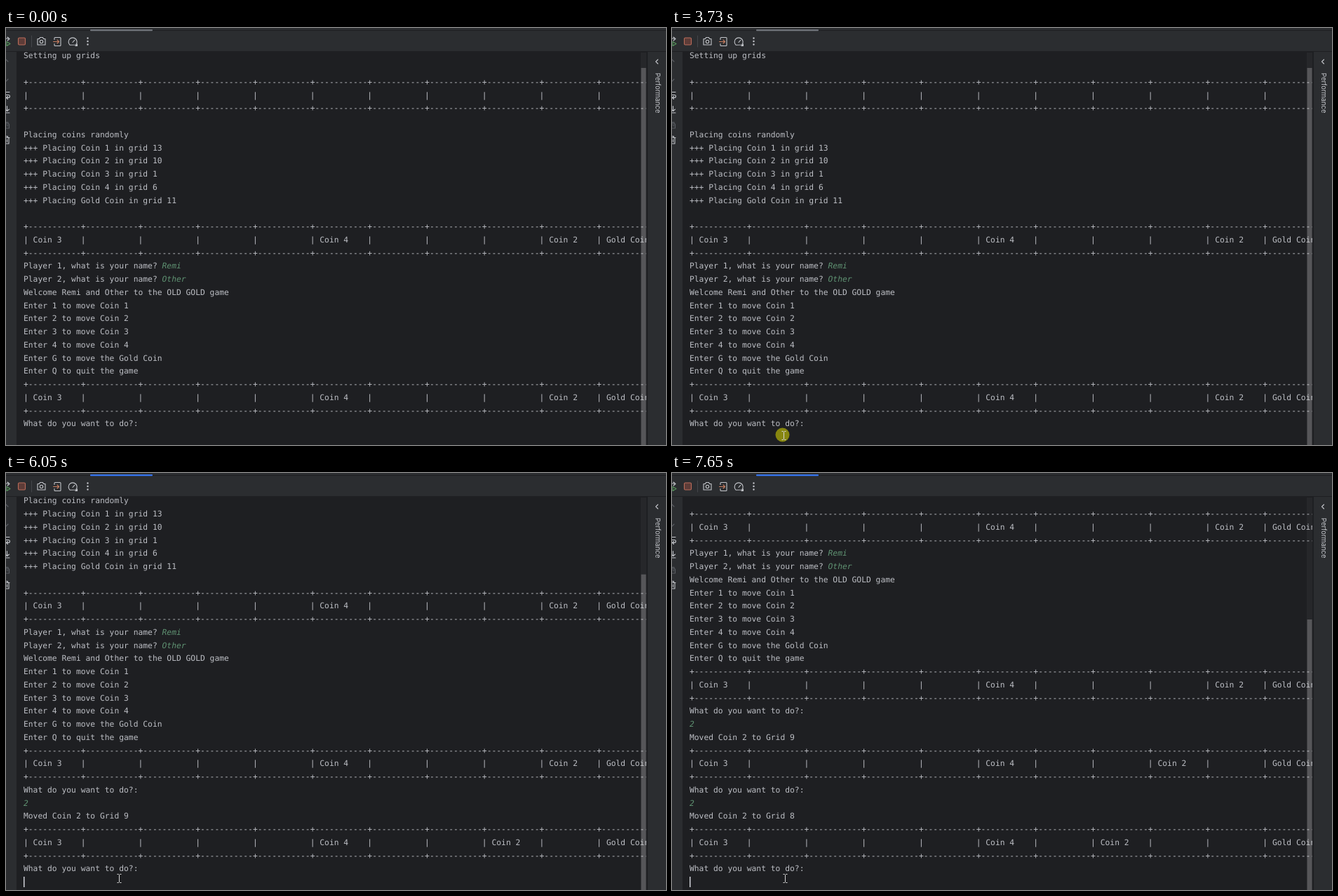
Recreate the animation shown at these times as an HTML page. Size 941 px wide and 595 px high, loop 8000 ms.

```html
<!DOCTYPE html>
<html lang="en">
<head>
<meta charset="utf-8">
<title>Coin game console</title>
<style>
  html, body { margin: 0; width: 100%; height: 100%; overflow: hidden; background: #1e1f22; }
  #console { position: absolute; left: 15px; top: 34px; width: 898px; height: 561px; overflow: hidden; }
  pre {
    position: absolute; left: 10px; margin: 0; color: #bcbec4;
    font: 11.326px/18.75px "DejaVu Sans Mono", monospace;
    text-rendering: geometricPrecision;
  }
  i { color: #5f9272; }
  svg { position: absolute; left: 0; top: 0; }
  .icon { fill: none; stroke: #c4c6cb; stroke-width: 1.1; stroke-linecap: round; stroke-linejoin: round; }
  .dim { stroke: #5a5d63; }
</style>
</head>
<body>
<div id="console"><pre id="output"></pre></div>
<svg width="941" height="595" viewBox="0 0 941 595">
  <!-- panels -->
  <path fill="#2b2d30" d="M0 0H941V33H0zM0 34H15V595H0zM915 34H941V595H915z"/>
  <path fill="#1e1f22" d="M0 3H941V4H0z"/>
  <rect id="tab" x="120" y="2" width="89" height="2.2" rx="1"/>

  <!-- toolbar -->
  <g class="icon">
    <path d="M-2 15H4M2 13l3 2.500-3 2.500"/>
    <path stroke="#57965c" d="M1 19.500l5 3-5 3z"/>
    <rect x="17.500" y="14" width="10" height="10" rx="1.500" fill="#5e3c38" stroke="#b96c5a"/>
    <path stroke="#43454a" d="M36.500 11V27"/>
    <path d="M45 15.500h2.500l1-2h4l1 2H56v8.500H45z"/>
    <circle cx="50.500" cy="19.500" r="2.200"/>
    <path d="M69 16.500V14.500q0-1 1-1h7q1 0 1 1v10q0 1-1 1h-7q-1 0-1-1v-2"/>
    <path stroke="#c77d60" d="M67.500 19.500H75M73 17l2.500 2.500L73 22"/>
    <path d="M91 24.200a6 6 0 1 1 8.500-.2zM95 20.500l2.800-3.200"/>
    <path fill="#c4c6cb" stroke="none" d="M102 22v4h-4z"/>
    <path stroke-width="2.400" d="M116.500 14.500v0M116.500 19v0M116.500 23.500v0"/>
  </g>

  <!-- left strip -->
  <g class="icon">
    <path class="dim" d="M-2 46l2-1 3 3M-2 75l2 1 3-3"/>
    <path d="M-2 91.500H5M-2 95.500H3q2.500 0 2.500 2t-2.500 2H1M2.500 97.500l-2 2 2 2"/>
    <path d="M1.500 111.500v7M-1 116l2.500 2.500L4.500 116M-2 121H5"/>
    <path class="dim" d="M-2 137H4.500V143H-2M0 137v-2.500h3V137M1 139.500h2"/>
    <path d="M-2 156.500H5M-1 156.500v-2H2.500v2M4 156.500V165H-2M1.500 159v3.500"/>
  </g>

  <!-- right strip -->
  <path class="icon" d="M929.500 45l-3 3 3 3"/>
  <text transform="translate(925.500 64) rotate(90)" fill="#c4c6cb" font-family="Inter, sans-serif" font-size="9.4">Performance</text>

  <!-- scrollbar -->
  <rect x="905" y="35" width="8" height="560" fill="#fff" opacity=".035"/>
  <rect id="thumb" x="905.500" width="7" height="560" fill="#fff" opacity=".22"/>

  <rect id="caret" width="1.500" height="15" fill="#ced0d6"/>
  <circle id="click" cx="157.500" cy="580.500" r="10" fill="#87860f"/>
  <path id="pointer" fill="none" stroke="#d6d6d6" d="M-3-6H-1L0-5 1-6H3M0-5V5M-3 6H-1L0 5 1 6H3"/>
</svg>
<script>
const LOOP = 8000, LINE = 18.75, COLUMN = 6.818, LEFT = 25, TOP = 30.3;
const PRESS = 3730, FOCUS = 3840, POINTER_STEP = 95;
const $ = id => document.getElementById(id);

const border = "+-----------".repeat(13) + "+";
const grid = coins => [
  border,
  Array.from({ length: 13 }, (_, n) => "| " + (coins[n + 1] || "").padEnd(10)).join("") + "|",
  border
];
const board = coin2 => grid({ 1: "Coin 3", 6: "Coin 4", 11: "Gold Coin", 13: "Coin 1", [coin2]: "Coin 2" });
const question = "What do you want to do?:";

const intro = [
  "Setting up grids", "", ...grid({}), "",
  "Placing coins randomly",
  ...[13, 10, 1, 6].map((cell, n) => `+++ Placing Coin ${n + 1} in grid ${cell}`),
  "+++ Placing Gold Coin in grid 11", "", ...board(10),
  "Player 1, what is your name? <i>Remi</i>",
  "Player 2, what is your name? <i>Other</i>",
  "Welcome Remi and Other to the OLD GOLD game",
  ...[1, 2, 3, 4].map(n => `Enter ${n} to move Coin ${n}`),
  "Enter G to move the Gold Coin",
  "Enter Q to quit the game",
  ...board(10), question
];

// Each turn: key typed, Enter pressed, answer printed, scrolling finished.
const turns = [
  { cell: 9, typed: 5440, entered: 5840, printed: 6050, settled: 6050 },
  { cell: 8, typed: 7060, entered: 7550, printed: 7550, settled: 7650 }
];
const inputTimes = [FOCUS, ...turns.flatMap(turn => [turn.typed, turn.entered])];

// Each glide starts where the previous one ended.
const pointerStart = { x: 383, y: 610 };
const glides = [
  { at: 810, steps: 2, x: 399, y: 552 },
  { at: 1120, steps: 3, x: 441, y: 486 },
  { at: 2210, steps: 2, x: 398, y: 514 },
  { at: 2510, steps: 7, x: 163, y: 571 },
  { at: 3330, steps: 4, x: 159, y: 581 },
  { at: 4130, steps: 2, x: 161, y: 578 }
];

function consoleAt(t) {
  const lines = [...intro];
  let scroll = 0, caretLine = lines.length, caretColumn = 0;
  for (const { cell, typed, entered, printed, settled } of turns) {
    if (t < typed) break;
    lines.push("<i>2</i>");
    caretColumn = t < entered ? 1 : 0;
    if (t < entered) break;
    if (t >= printed) lines.push(`Moved Coin 2 to Grid ${cell}`, ...board(cell), question);
    caretLine = lines.length;
    scroll = caretLine - intro.length - (t < settled && t >= printed ? 1 / 3 : 0);
  }
  return { text: lines.join("\n"), scroll, caretLine, caretColumn };
}

function pointerAt(t) {
  let { x, y } = pointerStart;
  for (const glide of glides) {
    if (t < glide.at) break;
    const p = Math.min(1, (Math.floor((t - glide.at) / POINTER_STEP) + 1) / glide.steps);
    const eased = p * p * (3 - 2 * p);
    x += (glide.x - x) * eased;
    y += (glide.y - y) * eased;
  }
  return { x: Math.round(x) + .5, y: Math.round(y) + .5 };
}

function caretOn(t) {
  const lastInput = inputTimes.findLast(time => time <= t);
  return lastInput !== undefined && (t - lastInput) % 1400 < 920;
}

const set = (id, attributes) => {
  for (const name in attributes) $(id).setAttribute(name, attributes[name]);
};
const show = (id, visible) => set(id, { visibility: visible ? "visible" : "hidden" });
let shownText;

function draw(now) {
  const t = now % LOOP;
  const { text, scroll, caretLine, caretColumn } = consoleAt(t);
  if (text !== shownText) $("output").innerHTML = shownText = text;
  $("output").style.top = TOP - 34 - scroll * LINE + "px";
  set("thumb", { y: 57 + 570 * scroll / (scroll + 33) });
  set("caret", {
    x: LEFT + caretColumn * COLUMN,
    y: Math.round(TOP + 2 + (caretLine - scroll) * LINE)
  });
  show("caret", caretOn(t));

  const { x, y } = pointerAt(t);
  set("pointer", { transform: `translate(${x} ${y})` });
  show("click", t >= PRESS && t < FOCUS);
  set("tab", { fill: t < FOCUS ? "#6f737a" : "#3574f0" });
  requestAnimationFrame(draw);
}
draw(0);
</script>
</body>
</html>
```
